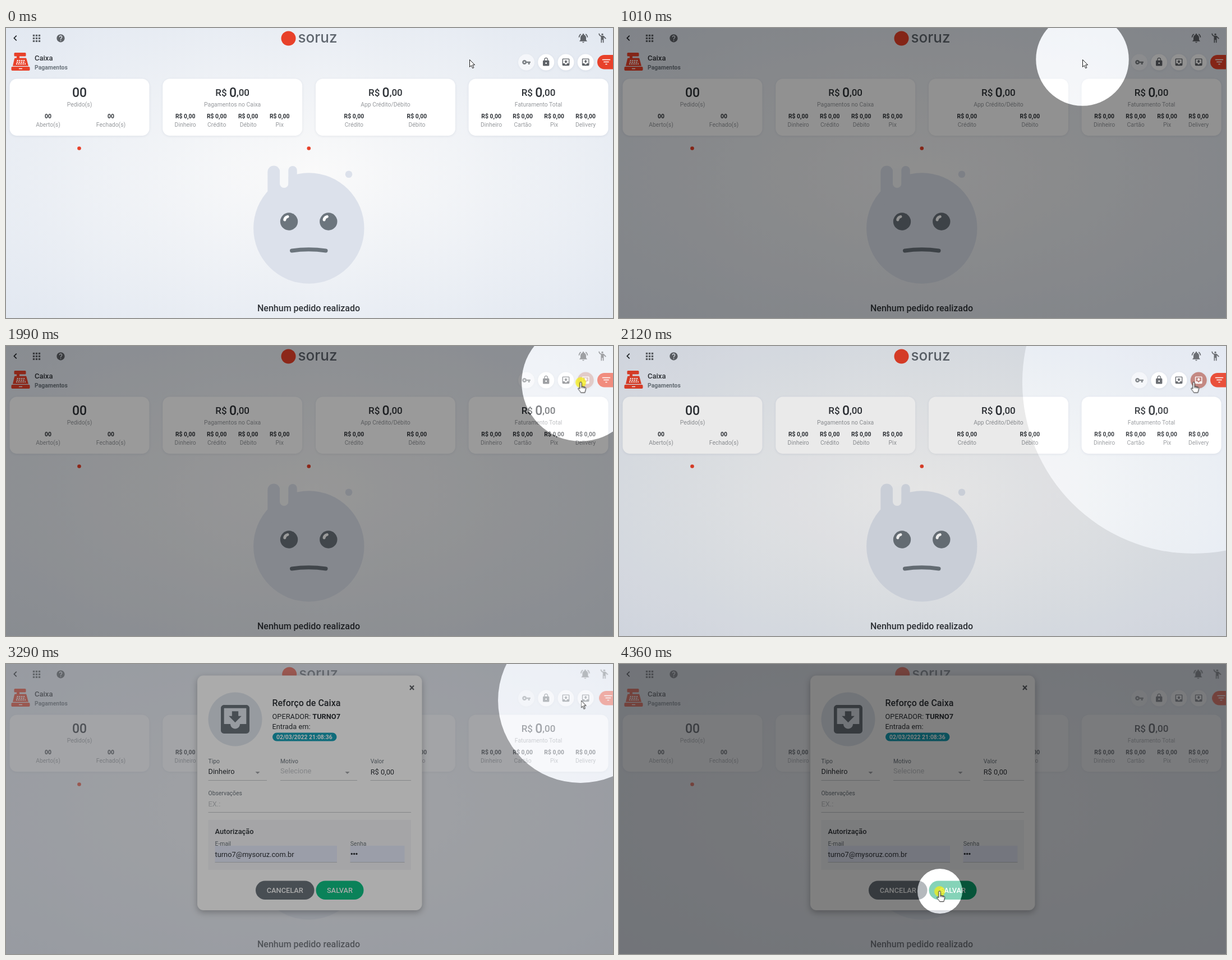
An HTML page that plays this animation: 1082x517 px, repeating every 4400 ms.

```html
<!DOCTYPE html>
<html lang="pt-BR">
<head>
<meta charset="utf-8">
<title>Caixa</title>
<style>
html, body { margin: 0; width: 100%; height: 100%; overflow: hidden; }
body { background: #fff; }
svg.stage { display: block; width: 1082px; height: 517px; background: radial-gradient(#fafafa, #e2e8f1); }
text { font: 10.4px Roboto, sans-serif; fill: #6c757d; }
.dark { fill: #2f3338; }
.mid { text-anchor: middle; }
.f13 { font-size: 12.8px; }
.f16 { font-size: 16px; }
.m { font-weight: 500; }
.b { font-weight: 700; }
.hint { fill: #c3c6ca; }
.cap { fill: #96999d; }
.w { fill: #fff; }
.red { fill: #e8412a; }
.ic { fill: #5f6368; }
.card, .btn { fill: #fff; filter: drop-shadow(0 1px 2px #0f1e3c14); }
.sheet { fill: #fff; filter: drop-shadow(0 4px 6px #0004); }
.line { stroke: #c6c9cc; fill: none; }

/* Everything shares one 4.4 s clock: percent = ms / 44 */
.a { animation: 4.4s linear infinite; }
.hold { animation-timing-function: step-end; }

.veil-on { animation-name: veil-on; }
@keyframes veil-on {
  0% { visibility: hidden } 19.09% { visibility: visible }
  56.14% { visibility: hidden } 72.73%, 100% { visibility: visible }
}
.veil, .spot { animation-timing-function: cubic-bezier(.41, .52, 0, .94); }
.veil { animation-name: veil; }
@keyframes veil {
  0%, 18.02% { opacity: 0 } 29.39%, 43.82% { opacity: .5 }
  55.18%, 71.66% { opacity: 0 } 83.02%, 100% { opacity: .5 }
}
.spot { animation-name: spot; }
@keyframes spot {
  0%, 18.02% { r: 360px } 29.39%, 43.82% { r: 40px }
  55.18%, 71.66% { r: 360px } 83.02%, 100% { r: 40px }
}
.follow { animation-name: follow; }
@keyframes follow {
  0%, 29.09% { transform: translate(826px, 56px) }
  30.45% { transform: translate(858px, 61px) }
  34.77% { transform: translate(967px, 64px) }
  38.64% { transform: translate(1020px, 65px) }
  40.45%, 79.09% { transform: translate(1024px, 65px) }
  81.36% { transform: translate(950px, 117px) }
  83.64% { transform: translate(871px, 176px) }
  85.68% { transform: translate(805px, 224px) }
  88.64% { transform: translate(705px, 300px) }
  92.05% { transform: translate(622px, 363px) }
  95.68% { transform: translate(576px, 401px) }
  97.73%, 100% { transform: translate(572px, 405px) }
}
.pointer { animation-name: pointer; }
@keyframes pointer {
  0%, 28.41% { transform: translate(826px, 56px) }
  29.77% { transform: translate(858px, 60px) }
  34.77% { transform: translate(981px, 64px) }
  37.95% { transform: translate(1020px, 65px) }
  39.77%, 77.27% { transform: translate(1024.5px, 64.5px) }
  79.55% { transform: translate(950px, 117px) }
  83.64% { transform: translate(812px, 217px) }
  86.82% { transform: translate(705px, 300px) }
  90.23% { transform: translate(622px, 363px) }
  93.86% { transform: translate(576px, 401px) }
  95.91%, 100% { transform: translate(571.5px, 405px) }
}
.arrow { animation-name: arrow; }
@keyframes arrow { 0% { opacity: 1 } 33.4% { opacity: 0 } 52% { opacity: 1 } 92.5%, 100% { opacity: 0 } }
.hand { animation-name: hand; }
@keyframes hand { 0% { opacity: 0 } 33.4% { opacity: 1 } 52% { opacity: 0 } 92.5%, 100% { opacity: 1 } }
.click { animation-name: click; }
@keyframes click { 0% { opacity: 0 } 43.86% { opacity: .75 } 47.7% { opacity: 0 } 98.4%, 100% { opacity: .75 } }

.lock { animation-name: lock; }
@keyframes lock { 0%, 33.4% { fill: #fff } 34.5% { fill: #f7cfc7 } 36.5%, 100% { fill: #fff } }
.out { animation-name: out; }
@keyframes out { 0%, 34.9% { fill: #fff } 36.5%, 37.3% { fill: #f5c4bb } 39%, 100% { fill: #fff } }
.in { animation-name: in; }
@keyframes in {
  0%, 37.8% { fill: #fff } 40%, 43.9% { fill: #f0cfc8 } 45.2% { fill: #d0aaa5 }
  50%, 55.3% { fill: #b5655d } 56.14%, 100% { fill: #fff }
}
.in-icon { animation-name: in-icon; }
@keyframes in-icon { 0%, 42% { fill: #5f6368 } 45%, 55.3% { fill: #fff } 56.14%, 100% { fill: #5f6368 } }

.nudge { animation-name: nudge; }
@keyframes nudge { 0% { transform: none } 51.7%, 100% { transform: translateX(3.4px) } }
.nudge-logo { animation-name: nudge-logo; }
@keyframes nudge-logo { 0% { transform: none } 51.7%, 100% { transform: translateX(1.7px) } }
.backdrop { animation-name: backdrop; }
@keyframes backdrop { 0%, 51.7% { opacity: 0 } 55.1%, 100% { opacity: .4 } }
.modal { animation-name: modal; }
@keyframes modal {
  0%, 51.7% { opacity: 0; transform: translateY(-50px) }
  55% { opacity: .97; transform: translateY(-14px) }
  56.14%, 100% { opacity: 1; transform: none }
}
.filled { animation-name: filled; }
@keyframes filled { 0% { opacity: 0 } 56.14%, 100% { opacity: 1 } }
.empty { animation-name: empty; }
@keyframes empty { 0% { opacity: 1 } 56.14%, 100% { opacity: 0 } }
.sec5 { animation-name: sec5; }
@keyframes sec5 { 0% { opacity: 1 } 59.09%, 100% { opacity: 0 } }
.sec6 { animation-name: sec6; }
@keyframes sec6 { 0% { opacity: 0 } 59.09%, 100% { opacity: 1 } }
.save { animation-name: save; }
@keyframes save { 0%, 92.5% { fill: #0fc285 } 95%, 100% { fill: #0ca872 } }
</style>
</head>
<body>
<svg class="stage" viewBox="0 0 1082 517" xmlns="http://www.w3.org/2000/svg">
<defs>
  <symbol id="back" viewBox="0 0 24 24"><path d="M15.41 7.41L14 6l-6 6 6 6 1.41-1.41L10.83 12z"/></symbol>
  <symbol id="apps" viewBox="0 0 24 24"><path d="M4 4h4v4H4zM10 4h4v4h-4zM16 4h4v4h-4zM4 10h4v4H4zM10 10h4v4h-4zM16 10h4v4h-4zM4 16h4v4H4zM10 16h4v4h-4zM16 16h4v4h-4z"/></symbol>
  <symbol id="help" viewBox="0 0 24 24"><path d="M12 2C6.48 2 2 6.48 2 12s4.48 10 10 10 10-4.48 10-10S17.52 2 12 2zm1 17h-2v-2h2v2zm2.07-7.75l-.9.92C13.45 12.9 13 13.5 13 15h-2v-.5c0-1.1.45-2.1 1.17-2.83l1.24-1.26c.37-.36.59-.86.59-1.41 0-1.1-.9-2-2-2s-2 .9-2 2H8c0-2.21 1.79-4 4-4s4 1.79 4 4c0 .88-.36 1.68-.93 2.25z"/></symbol>
  <symbol id="bell" viewBox="0 0 24 24"><path d="M7.58 4.08L6.15 2.65C3.75 4.48 2.17 7.3 2.03 10.5h2c.15-2.65 1.51-4.97 3.55-6.42zm12.39 6.42h2c-.15-3.2-1.73-6.02-4.12-7.85l-1.42 1.43c2.02 1.45 3.39 3.77 3.54 6.42zM18 11c0-3.07-1.64-5.64-4.5-6.32V4c0-.83-.67-1.5-1.5-1.5s-1.5.67-1.5 1.5v.68C7.63 5.36 6 7.92 6 11v5l-2 2v1h16v-1l-2-2v-5zm-6 11c1.1 0 2-.9 2-2h-4c0 1.1.9 2 2 2z"/></symbol>
  <symbol id="person" viewBox="0 0 24 24"><circle cx="12" cy="4" r="2"/><path d="M15.89 8.11C15.5 7.72 14.83 7 13.53 7h-2.54C8.24 6.99 6 4.75 6 2H4c0 3.16 2.11 5.84 5 6.71V22h2v-6h2v6h2V10.05L18.95 14l1.41-1.41-4.47-4.48z"/></symbol>
  <symbol id="key" viewBox="0 0 24 24"><path d="M12.65 10C11.83 7.67 9.61 6 7 6c-3.31 0-6 2.69-6 6s2.69 6 6 6c2.61 0 4.83-1.67 5.65-4H17v4h4v-4h2v-4H12.65zM7 14c-1.1 0-2-.9-2-2s.9-2 2-2 2 .9 2 2-.9 2-2 2z"/></symbol>
  <symbol id="lock" viewBox="0 0 24 24"><path d="M18 8h-1V6c0-2.76-2.24-5-5-5S7 3.24 7 6v2H6c-1.1 0-2 .9-2 2v10c0 1.1.9 2 2 2h12c1.1 0 2-.9 2-2V10c0-1.1-.9-2-2-2zm-6 9c-1.1 0-2-.9-2-2s.9-2 2-2 2 .9 2 2-.9 2-2 2zm3.1-9H8.9V6c0-1.71 1.39-3.1 3.1-3.1 1.71 0 3.1 1.39 3.1 3.1v2z"/></symbol>
  <path id="tray" d="M19 3H5c-1.1 0-2 .9-2 2v14c0 1.1.9 2 2 2h14c1.1 0 2-.9 2-2V5c0-1.1-.9-2-2-2zm0 12h-4c0 1.66-1.35 3-3 3s-3-1.34-3-3H5V5h14z"/>
  <symbol id="inbox" viewBox="0 0 24 24"><use href="#tray"/><path d="M16 10h-2V7h-4v3H8l4 4z"/></symbol>
  <symbol id="outbox" viewBox="0 0 24 24"><use href="#tray"/><path d="M16 11h-2v3h-4v-3H8l4-4z"/></symbol>
  <symbol id="filter" viewBox="0 0 24 24"><path d="M10 18h4v-2h-4zM3 6v2h18V6zM6 13h12v-2H6z"/></symbol>
</defs>

<!-- header -->
<g class="ic">
  <use href="#back" x="6.5" y="8" width="20" height="20" fill="#212529"/>
  <use href="#apps" x="44.5" y="8.3" width="20" height="20"/>
  <use href="#help" x="89" y="9.8" width="17" height="17"/>
  <g class="a hold nudge">
    <use href="#bell" x="1019" y="8" width="20" height="20"/>
    <use href="#person" x="1053" y="8" width="20" height="20"/>
  </g>
</g>
<g class="a hold nudge-logo">
  <circle class="red" cx="503.5" cy="18.5" r="13"/>
  <text x="520.5" y="26" style="font: 500 26px Inter, sans-serif; fill: #5f666e">soruz</text>
</g>
<g class="red">
  <rect x="14.5" y="44" width="21" height="6.5" rx="1.5"/>
  <path d="M19 50h5v4h-5zM16.500 53.500h18.500q1.200 0 1.500 1.200l3.500 13H12l3-13q.3-1.200 1.500-1.200z"/>
  <rect x="9.500" y="69" width="33" height="7" rx="1.800"/>
  <path d="M19.500 58h14M18.800 61h15.500M18 64h17" stroke="#fff" stroke-width="1.800" stroke-dasharray="2.300 1.500"/>
  <path d="M23 72.500h6" stroke="#fff" stroke-width="1.400"/>
</g>
<text class="dark m" x="51" y="58" style="font-size: 13px">Caixa</text>
<text class="b" x="51" y="74">Pagamentos</text>

<g opacity=".55"><circle class="btn" cx="927.500" cy="61" r="14.500"/></g>
<use class="ic" href="#key" x="919.500" y="53" width="16" height="16" opacity=".8"/>
<circle class="btn a lock" cx="962.700" cy="61" r="14.500"/>
<use class="ic" href="#lock" x="954.200" y="52" width="17" height="17"/>
<circle class="btn a out" cx="998" cy="61" r="14.500"/>
<use class="ic" href="#outbox" x="989.500" y="52.300" width="17" height="17"/>
<circle class="btn a in" cx="1033.200" cy="61" r="14.500"/>
<use class="ic a in-icon" href="#inbox" x="1024.700" y="52.300" width="17" height="17"/>
<g class="a hold nudge">
  <rect class="red" x="1054" y="48" width="60" height="25.500" rx="12.750"/>
  <use class="w" href="#filter" x="1060.500" y="51" width="19" height="19"/>
</g>

<g id="cards"></g>

<!-- empty state -->
<circle class="red" cx="130.500" cy="214.500" r="3.300"/>
<circle class="red" cx="539.800" cy="214.500" r="3.300"/>
<g fill="#dce1eb">
  <circle cx="539.800" cy="357" r="98.700"/>
  <rect x="466.300" y="245.500" width="22" height="70" rx="11"/>
  <rect x="488" y="256" width="15.500" height="29" rx="7.700" fill="#f7f8f9"/>
  <path d="M488 250h15.500v26H488z" fill="#f7f8f9"/>
  <rect x="503.300" y="246" width="15.400" height="40" rx="7.700"/>
  <circle cx="611" cy="260.700" r="6.300"/>
</g>
<g id="eye">
  <circle cx="504.500" cy="345" r="15.700" fill="#6c757d"/>
  <path d="M496.800 342q.5-4.500 5.200-5.700" fill="none" stroke="#fff" stroke-width="5" stroke-linecap="round"/>
</g>
<use href="#eye" x="70.300"/>
<path d="M509.500 397q30-4.500 60.500 0" fill="none" stroke="#6c757d" stroke-width="7" stroke-linecap="round"/>
<text class="dark m f16 mid" x="539.600" y="505">Nenhum pedido realizado</text>

<rect class="a backdrop" width="1082" height="517" fill="#e0e6f0"/>

<!-- dialog -->
<g class="a modal">
  <rect class="sheet" x="341" y="20.500" width="400.500" height="418.500" rx="11"/>
  <path d="M720 38.500l7 7.500M727 38.500l-7 7.500" stroke="#5f6368" stroke-width="2.200"/>
  <circle cx="408.500" cy="98.500" r="48" fill="#e1e7ef"/>
  <use href="#inbox" x="374.500" y="64.500" width="68" height="68" fill="#6c757d"/>
  <text class="dark m f16" x="474.500" y="74.500">Reforço de Caixa</text>
  <text class="dark f13" x="474.500" y="97.700">OPERADOR: <tspan class="b">TURNO7</tspan></text>
  <text class="dark f13" x="474.500" y="115.500">Entrada em:</text>
  <rect x="475" y="122.500" width="114.500" height="15" rx="7.500" fill="#17a2b8"/>
  <text class="w b a hold sec5" x="482" y="133.600">02/03/2022 21:08:35</text>
  <text class="w b a hold sec6" x="482" y="133.600">02/03/2022 21:08:36</text>

  <text x="360.500" y="177">Tipo</text>
  <text x="489" y="177">Motivo</text>
  <text x="649.700" y="177">Valor</text>
  <text class="dark f13" x="360.500" y="195.500">Dinheiro</text>
  <text class="hint f13" x="489" y="194.500">Selecione</text>
  <text class="dark f13" x="649.700" y="196.500">R$ 0,00</text>
  <path d="M444.500 192h8l-4 4zM604.500 192h8l-4 4z" fill="#a5a8ab"/>
  <text x="360.500" y="234">Observações</text>
  <text class="hint f13" x="360.500" y="253.500">EX.:</text>
  <path class="line" d="M360.500 207.500H465M489 207.500h137M649.500 207.500H722M360.500 264.500H722"/>

  <rect x="360.500" y="278" width="361.500" height="89" fill="#f6f7f9"/>
  <text class="dark m f13" x="372.500" y="302.500">Autorização</text>
  <g class="a hold filled">
    <path d="M372.500 324h217.500v30H372.500zM613.500 324h97v30h-97z" fill="#e8ecfc"/>
    <text class="dark f13" x="372.500" y="343.500">turno7@mysoruz.com.br</text>
    <g class="dark"><circle cx="616.300" cy="338.500" r="1.700"/><circle cx="620.600" cy="338.500" r="1.700"/><circle cx="624.900" cy="338.500" r="1.700"/></g>
  </g>
  <text class="hint f13 a hold empty" x="372.500" y="343.500">E-mail válido</text>
  <text x="372.500" y="324">E-mail</text>
  <text x="613.700" y="324">Senha</text>
  <path class="line" d="M372.500 353.500H590M613.500 353.500h97"/>

  <rect x="445" y="386.500" width="104.500" height="33.500" rx="16.700" fill="#6c757d"/>
  <rect class="a save" x="552.500" y="386.500" width="85" height="33.500" rx="16.700"/>
  <text class="w m f13 mid" x="497.300" y="407.500">CANCELAR</text>
  <text class="w m f13 mid" x="595" y="407.500">SALVAR</text>
</g>

<!-- spotlight -->
<g class="a hold veil-on">
  <g class="a veil">
    <rect width="1082" height="517"/>
    <g class="a follow"><circle class="a spot" r="40" fill="#fff"/></g>
  </g>
</g>

<g class="a pointer" fill="#fff" stroke="#1b1b1b" stroke-linejoin="round">
  <circle class="a hold click" cy=".5" r="9.500" fill="#f4ee14" stroke="none"/>
  <path class="a hold arrow" d="M.5.500V13.500l3-2.800 2.200 5 2.200-1-2.200-4.900h4z"/>
  <g class="a hold hand">
    <path d="M-1.700 1.500a1.700 1.700 0 0 1 3.400 0V7.500l5.600 1.200q2 .6 1.800 2.800l-.9 4.500-.9 2.700H.2q-1.200-2.400-3.600-5-2-2-.8-3 1-.7 2.500 1z"/>
    <path d="M1.700 7v3.500M4.200 8.200v2.600M6.600 8.800v2.400" fill="none"/>
  </g>
</g>
</svg>

<script>
const money = 'R$ 0,00';
const cards = [
  ['', 'Pedido(s)', 'Aberto(s)', 'Fechado(s)'],
  ['R$', 'Pagamentos no Caixa', 'Dinheiro', 'Crédito', 'Débito', 'Pix'],
  ['R$', 'App Crédito/Débito', 'Crédito', 'Débito'],
  ['R$', 'Faturamento Total', 'Dinheiro', 'Cartão', 'Pix', 'Delivery']
];

const label = (x, y, cls, body) => `<text class="mid ${cls}" x="${x}" y="${y}">${body}</text>`;

function card([unit, title, ...cols], i) {
  const c = 131 + 272.7 * i;
  const step = 224 / cols.length;
  const span = (size, dy, s) => `<tspan font-size="${size}" dy="${dy}" style="font-size:${size}px">${s}</tspan>`;
  const total = unit
    ? label(c, 120.5, 'dark m', span(17, 0, 'R$ ') + span(23, 2, '0') + span(17, -2, ',00'))
    : label(c, 123, 'dark m', span(23, 0, '00'));
  const parts = cols.map((name, k) => {
    const x = c - 112 + step * (k + .5);
    return label(x, 161, 'dark b', unit ? money : '00') + label(x, 176.3, 'cap', name);
  });
  return `<rect class="card" x="${c - 124.5}" y="90.500" width="249" height="101.500" rx="13"/>` +
    total + label(c, 140.3, 'cap', title) + parts.join('');
}

document.getElementById('cards').innerHTML = cards.map(card).join('');
</script>
</body>
</html>
```
